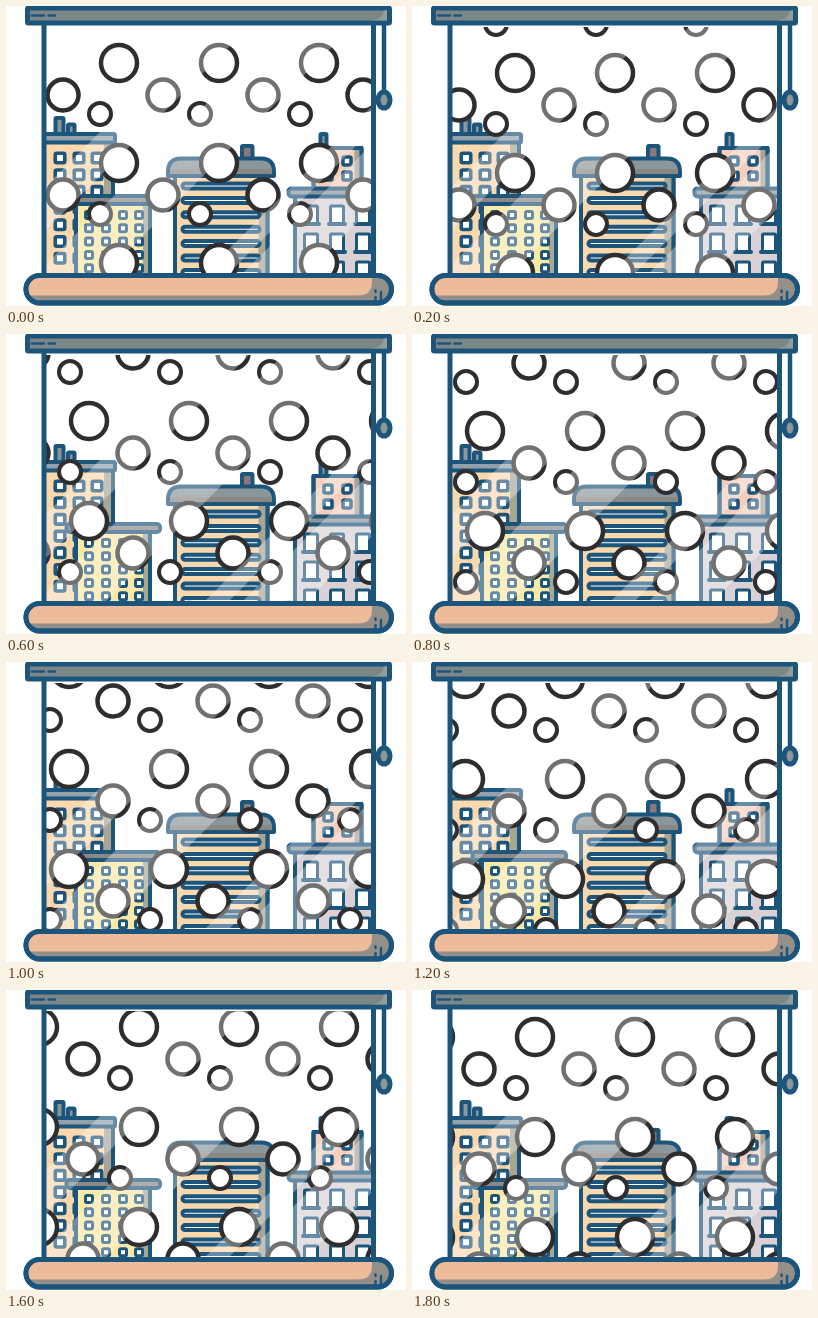
Animation, 400 px wide and 300 px high, one loop 2000 ms. Source, as an HTML page:

```html
<!DOCTYPE html>
<html lang="en">
<head>
<meta charset="utf-8">
<title>Snow outside the window</title>
<style>
  html, body { margin: 0; width: 100%; height: 100%; overflow: hidden; background: #fff; }
  svg { display: block; width: 400px; height: 300px; }
  .line { stroke: #1c557c; stroke-linecap: round; stroke-linejoin: round; }
  #snow { animation: fall 2s steps(10, end) infinite; }
  #snow circle { fill: #fff; stroke: #2e2e30; }
  @keyframes fall { to { transform: translate(-100px, 100px); } }
</style>
</head>
<body>
<svg viewBox="0 0 400 300">
  <defs>
    <clipPath id="pane"><rect x="40" y="21" width="326" height="247"/></clipPath>
  </defs>
  <g clip-path="url(#pane)">
    <g id="city" class="line" stroke-width="4"></g>
    <g id="snow"></g>
    <g id="shine" fill="#fff" fill-opacity=".32"></g>
  </g>
  <g id="frame" class="line" stroke-width="5"></g>
</svg>
<script>
  const GREY = '#8b969b', PEACH = '#fad8ae', SHADE = '#8b8784';
  const byId = id => document.getElementById(id);
  const city = byId('city'), snow = byId('snow'), shine = byId('shine'), frame = byId('frame');

  function add(parent, tag, attrs) {
    const el = document.createElementNS('http://www.w3.org/2000/svg', tag);
    for (const key in attrs) el.setAttribute(key, attrs[key]);
    return parent.appendChild(el);
  }
  const box = (parent, x, y, width, height, fill, rx = 0, more = {}) =>
    add(parent, 'rect', { x, y, width, height, fill, rx, ...more });
  const path = (parent, d, fill = 'none', more = {}) => add(parent, 'path', { d, fill, ...more });

  function wall(x, y, w, h, fill, shade) {
    box(city, x, y, w, h, fill);
    box(city, x + w - shade - 1, y, shade, h, '#8d958d', 0, { stroke: 'none', opacity: .75 });
    box(city, x, y, w, h, 'none');
  }

  function windows(xs, y, pitch, rows, size, weight) {
    for (let r = 0; r < rows; r++)
      for (const x of xs)
        box(city, x - size / 2, y + r * pitch - size / 2, size, size, '#fff', 1.5, { 'stroke-width': weight });
  }

  // Tall block on the left
  box(city, 49.5, 112, 8, 18, GREY, 1);
  box(city, 62, 118.5, 6.5, 12, GREY, 1);
  wall(34, 136, 73, 140, PEACH, 8);
  box(city, 30, 128, 79, 8.5, '#93a2aa', 1.5);
  windows([54, 73, 91], 152, 16.7, 7, 9.5, 3.6);

  // Low yellow block
  wall(70, 197, 74, 80, '#fae8a6', 6);
  box(city, 60.5, 190, 93.5, 8, SHADE, 3);
  windows([83, 100, 117, 133], 209, 13.3, 5, 7, 3);

  // Block with slats and a curved roof
  box(city, 236, 140, 10.5, 14, '#8b7775', 1);
  wall(169, 168, 92.5, 110, PEACH, 8);
  for (let y = 180; y < 270; y += 14.4)
    box(city, 176.5, y - 2.5, 77, 5, '#fff', 2.5, { 'stroke-width': 4 });
  const roof = 'M162 170V166Q162 152.5 175 152.5H255Q268 152.5 268 166V170Z';
  path(city, roof, GREY);
  box(city, 164, 163, 102, 5, SHADE, 0, { stroke: 'none' });

  // Block on the right
  box(city, 314.5, 128, 6, 16, GREY, 1);
  wall(307.5, 142, 48, 45, '#f5cfbb', 6);
  windows([322, 341], 155, 15, 2, 8, 3.6);
  wall(289, 190, 90, 86, '#d9d1d3', 1);
  box(city, 282.5, 182.5, 92, 8, GREY, 3);
  for (const y of [200, 228, 256])
    for (const x of [305, 331, 357]) {
      box(city, x - 6.5, y, 13, 18, '#fff', 1, { 'stroke-width': 3 });
      path(city, `M${x - 8} ${y + 18}h16`);
    }

  // One repeating tile of flakes: x, y, radius, line
  const flakes = [[13, 57, 18, 4.5], [57, 89, 15.5, 4.5], [94, 108, 11, 4]];
  for (let row = -2; row < 3; row++)
    for (let col = -1; col < 5; col++)
      for (const [x, y, r, w] of flakes)
        add(snow, 'circle', { cx: x + col * 100, cy: y + row * 100, r, 'stroke-width': w });

  // Diagonal reflections, bounded by x + y
  for (const [from, to] of [[220, 264], [298, 367], [466, 490], [504, 568]])
    path(shine, `M${from} 0H${to}L${to - 300} 300H${from - 300}Z`, '#fff');

  // Blind rail, sides, cord and sill
  path(frame, 'M38 18V270M367.5 18V270');
  path(frame, 'M378 18V86', 'none', { 'stroke-width': 4.5 });
  add(frame, 'ellipse', { cx: 378, cy: 94, rx: 6, ry: 8, fill: '#8c969b' });
  box(frame, 21.5, 2, 362, 15, '#7b8687', 1);
  path(frame, 'M364 14.5Q376 14 378 4.5H381V14.5Z', '#959b9b', { stroke: 'none' });
  path(frame, 'M26 9.5H38M42.5 9.5H49', 'none', { 'stroke-width': 2.5 });
  box(frame, 20, 269.5, 365.5, 27.5, '#958f89', 13.7);
  path(frame, 'M21 283Q21 270 34 270H366V276Q366 289.5 352 289.5H23Z', '#edba9a', { stroke: 'none' });
  box(frame, 20, 269.5, 365.5, 27.5, 'none', 13.7);
  path(frame, 'M369.5 284.5V286M369.5 291V295M375 286V295', 'none', { 'stroke-width': 2.5 });
</script>
</body>
</html>
```
